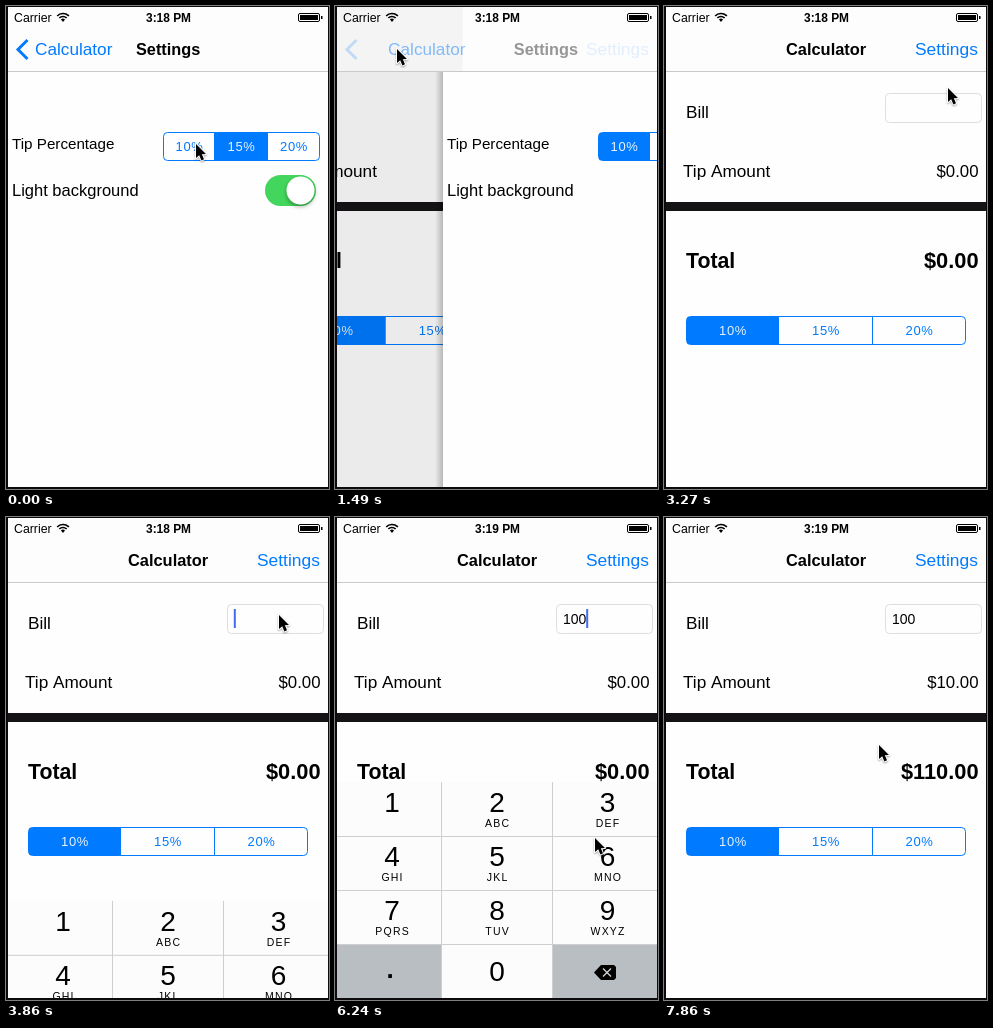
An HTML page with a canvas that plays this animation: 323x483 px, repeating every 8 s.

```html
<!DOCTYPE html>
<html lang="en">
<head>
<meta charset="utf-8">
<title>Tip calculator</title>
<style>
html, body { margin: 0; width: 323px; height: 483px; overflow: hidden; background: #0c0a0d; }
canvas { display: block; }
</style>
</head>
<body>
<canvas id="stage" width="323" height="483"></canvas>
<script>
const c = document.getElementById('stage').getContext('2d');
const LOOP = 8000, STEPS = 54;
const BLUE = '#007aff', PAGE = '#fefefe', BAR = '#fdfdfd', INK = '#000';

// Pointer positions: step, x, y (held until the next entry)
const pointer = [
  [0, 190, 138], [5, 188, 134], [6, 172, 116], [7, 120, 78], [8, 76, 50], [9, 62, 43],
  [15, 98, 58], [16, 148, 84], [17, 140, 158], [18, 128, 262], [19, 180, 320],
  [20, 276, 316], [21, 291, 200], [22, 284, 82], [23, 277, 92], [24, 273, 98],
  [39, 275, 112], [40, 272, 150], [41, 262, 205], [42, 260, 321], [43, 246, 300],
  [44, 222, 258], [45, 201, 236], [46, 215, 228]
];
const slide = { 10: .33, 11: .82, 12: .97 };
const keysUp = { 26: .45, 27: .9, 47: .75, 48: .2 };
const letters = ['', 'ABC', 'DEF', 'GHI', 'JKL', 'MNO', 'PQRS', 'TUV', 'WXYZ'];

function rect(x, y, w, h, color) {
  c.fillStyle = color;
  c.fillRect(x, y, w, h);
}

function text(str, x, y, size, { color = INK, bold = false, align = 'left', gap = 0, alpha = 1 } = {}) {
  if (alpha <= 0) return;
  c.globalAlpha = alpha;
  c.font = `${bold ? 'bold ' : ''}${size}px "Liberation Sans", Arial, sans-serif`;
  c.letterSpacing = gap + 'px';
  c.textAlign = align;
  c.fillStyle = color;
  c.fillText(str, x, y);
  c.globalAlpha = 1;
}

function poly(points, close) {
  c.beginPath();
  points.forEach(([x, y]) => c.lineTo(x, y));
  if (close) c.closePath();
}

function roundBox(x, y, w, h, r) {
  c.beginPath();
  c.roundRect(x, y, w, h, r);
}

// edges: left side, two dividers, right side
function segments(edges, y, selected, pressed) {
  const [left, , , right] = edges, h = 28;
  c.save();
  roundBox(left, y, right - left, h, 4);
  c.save();
  c.clip();
  for (let i = 0; i < 3; i++) {
    const x = edges[i], w = edges[i + 1] - x;
    if (i === selected) rect(x, y, w, h, BLUE);
    else if (i === pressed) rect(x, y, w, h, 'rgba(0,122,255,.2)');
    if (i) rect(x - .5, y, 1, h, BLUE);
    text(['10%', '15%', '20%'][i], x + w / 2 + .5, y + 18, 13,
      { color: i === selected ? '#e8f3ff' : BLUE, align: 'center', gap: .6 });
  }
  c.restore();
  c.strokeStyle = BLUE;
  c.lineWidth = 1;
  roundBox(left, y, right - left, h, 4);
  c.stroke();
  c.restore();
}

function settingsPage(s) {
  rect(2, 66, 320, 415, PAGE);
  text('Tip Percentage', 6, 143, 15.2);
  segments([157.5, 208.5, 261.5, 313.5], 126.5, s < 3 ? 1 : 0, s === 2 ? 0 : -1);
  text('Light background', 6, 190, 16.5);
  c.fillStyle = '#43d65c';
  roundBox(259, 169, 51, 31, 15.5);
  c.fill();
  c.save();
  c.shadowColor = 'rgba(0,0,0,.35)';
  c.shadowBlur = 4;
  c.shadowOffsetY = 2;
  c.fillStyle = '#fff';
  c.beginPath();
  c.arc(294.5, 184.5, 14, 0, 7);
  c.fill();
  c.restore();
}

function calculatorPage(s) {
  const done = s >= 47;
  const right = { align: 'right' };
  rect(2, 66, 320, 415, PAGE);
  text('Bill', 22, 112, 17.2);
  c.strokeStyle = '#dedede';
  c.lineWidth = 1;
  roundBox(221.5, 87.5, 96, 29, 4);
  c.stroke();
  const bill = s < 30 ? '' : s < 32 ? '1' : '100';
  text(bill, 228, 107, 14);
  if (s >= 25 && !done && s !== 36)
    rect(228 + bill.length * 7.8 - .2, 92, 2, 19, '#426bf2');
  text('Tip Amount', 19, 171, 17.2);
  text(done ? '$10.00' : '$0.00', 314.5, 171, 16.8, right);
  rect(2, 196, 320, 9, '#141214');
  text('Total', 22, 262, 21.3, { bold: true });
  text(done ? '$110.00' : '$0.00', 314.5, 262, 21.8, { bold: true, ...right });
  segments([22.5, 114.5, 208.5, 301.5], 310.5, 0, -1);
}

function keyboard(shown) {
  if (!shown) return;
  const mid = { align: 'center' }, centers = [57, 162, 272.5];
  c.save();
  c.translate(0, 481 - 216 * shown);
  rect(2, 0, 320, 216, '#fcfcfc');
  rect(2, 162, 105, 54, '#b9bec3');
  rect(217, 162, 105, 54, '#b9bec3');
  for (const y of [54, 108, 162]) rect(2, y, 320, 1, '#cfcfd1');
  for (const x of [106, 217]) rect(x, 0, 1, 216, '#cfcfd1');
  letters.forEach((word, i) => {
    const x = centers[i % 3], y = 54 * Math.floor(i / 3);
    text(i + 1, x, y + 30, 28, mid);
    text(word, x + .6, y + 45, 10.5, { ...mid, gap: 1.2 });
  });
  text('0', 162, 199, 28, mid);
  text('.', 55, 196, 26, { ...mid, bold: true });
  c.fillStyle = INK;
  poly([[259, 190.5], [266, 183], [279, 183], [281, 185], [281, 196], [279, 198], [266, 198]], true);
  c.fill();
  c.strokeStyle = '#d5d8da';
  c.lineWidth = 1.3;
  for (const d of [4, -4]) {
    poly([[268, 190.5 - d], [276, 190.5 + d]]);
    c.stroke();
  }
  c.restore();
}

function navBar(s, p) {
  rect(2, 0, 320, 66, BAR);
  if (p > 0 && p < 1) rect(2, 0, Math.min(320, 320 * p + 20), 66, `rgba(0,0,0,${.05 * (1 - p)})`);
  rect(2, 65, 320, 1, '#c9c9cb');
  const press = s === 9 ? .35 : 1;
  c.globalAlpha = Math.max(0, 1 - 2.4 * p) * press;
  c.strokeStyle = BLUE;
  c.lineWidth = 3;
  poly([[21.5, 34], [12, 43.5], [21.5, 53]]);
  c.stroke();
  c.globalAlpha = 1;
  text('Calculator', 29 + 73 * p, 49, 17.2, { color: BLUE, alpha: (1 - 1.6 * p) * press });
  text('Settings', 130 + 148 * p, 49, 16.3, { bold: true, alpha: 1 - 1.8 * p });
  text('Calculator', 122 - 50 * (1 - p), 49, 16.4, { bold: true, alpha: 2 * p - 1 });
  text('Settings', 251, 49, 17.4, { color: BLUE, alpha: p * p });
}

function statusBar(s) {
  text('Carrier', 8, 16, 12.3);
  text(s < 27 ? '3:18 PM' : '3:19 PM', 162.5, 16, 11.9, { bold: true, align: 'center' });
  c.strokeStyle = c.fillStyle = INK;
  c.lineWidth = 1.6;
  for (const r of [5, 8]) {
    c.beginPath();
    c.arc(57, 15.5, r, -Math.PI * .76, -Math.PI * .24);
    c.stroke();
  }
  c.beginPath();
  c.moveTo(57, 16);
  c.arc(57, 15.5, 2.8, -Math.PI * .76, -Math.PI * .24);
  c.fill();
  c.lineWidth = 1;
  roundBox(292.5, 7.5, 21, 8, 1.5);
  c.stroke();
  rect(294, 9, 18, 5, INK);
  rect(315, 10, 1.5, 3, INK);
}

function arrow(s) {
  const [, x, y] = pointer.findLast(([step]) => step <= s);
  c.save();
  c.translate(x, y);
  poly([[0, 0], [0, 14], [3.2, 11.2], [5.4, 16.4], [8, 15.3], [5.8, 10.3], [10, 10]], true);
  c.lineJoin = 'round';
  c.strokeStyle = '#fff';
  c.lineWidth = 2;
  c.shadowColor = 'rgba(0,0,0,.35)';
  c.shadowBlur = 2;
  c.shadowOffsetY = 1;
  c.stroke();
  c.shadowColor = 'transparent';
  c.fillStyle = INK;
  c.fill();
  c.restore();
}

function draw(s) {
  const p = slide[s] ?? (s < 10 ? 0 : 1);
  const shown = keysUp[s] ?? (s > 27 && s < 47 ? 1 : 0);
  rect(0, 0, 323, 483, '#0c0a0d');
  c.save();
  c.beginPath();
  c.rect(2, 1, 320, 480);
  c.clip();
  if (p > 0) {
    c.save();
    c.translate(-96 * (1 - p), 0);
    calculatorPage(s);
    c.restore();
  }
  if (p < 1) {
    const x = Math.round(320 * p);
    rect(2, 66, x, 415, `rgba(0,0,0,${.11 * (1 - p)})`);
    const shade = c.createLinearGradient(x - 6, 0, x + 2, 0);
    shade.addColorStop(0, 'rgba(0,0,0,0)');
    shade.addColorStop(1, 'rgba(0,0,0,.22)');
    rect(x - 6, 66, 8, 415, shade);
    c.save();
    c.translate(x, 0);
    settingsPage(s);
    c.restore();
  }
  keyboard(shown);
  navBar(s, p);
  statusBar(s);
  arrow(s);
  c.restore();
}

const start = performance.now();
function tick() {
  const t = (performance.now() - start) % LOOP;
  draw(Math.floor(t * STEPS / LOOP));
  requestAnimationFrame(tick);
}
tick();
</script>
</body>
</html>
```
